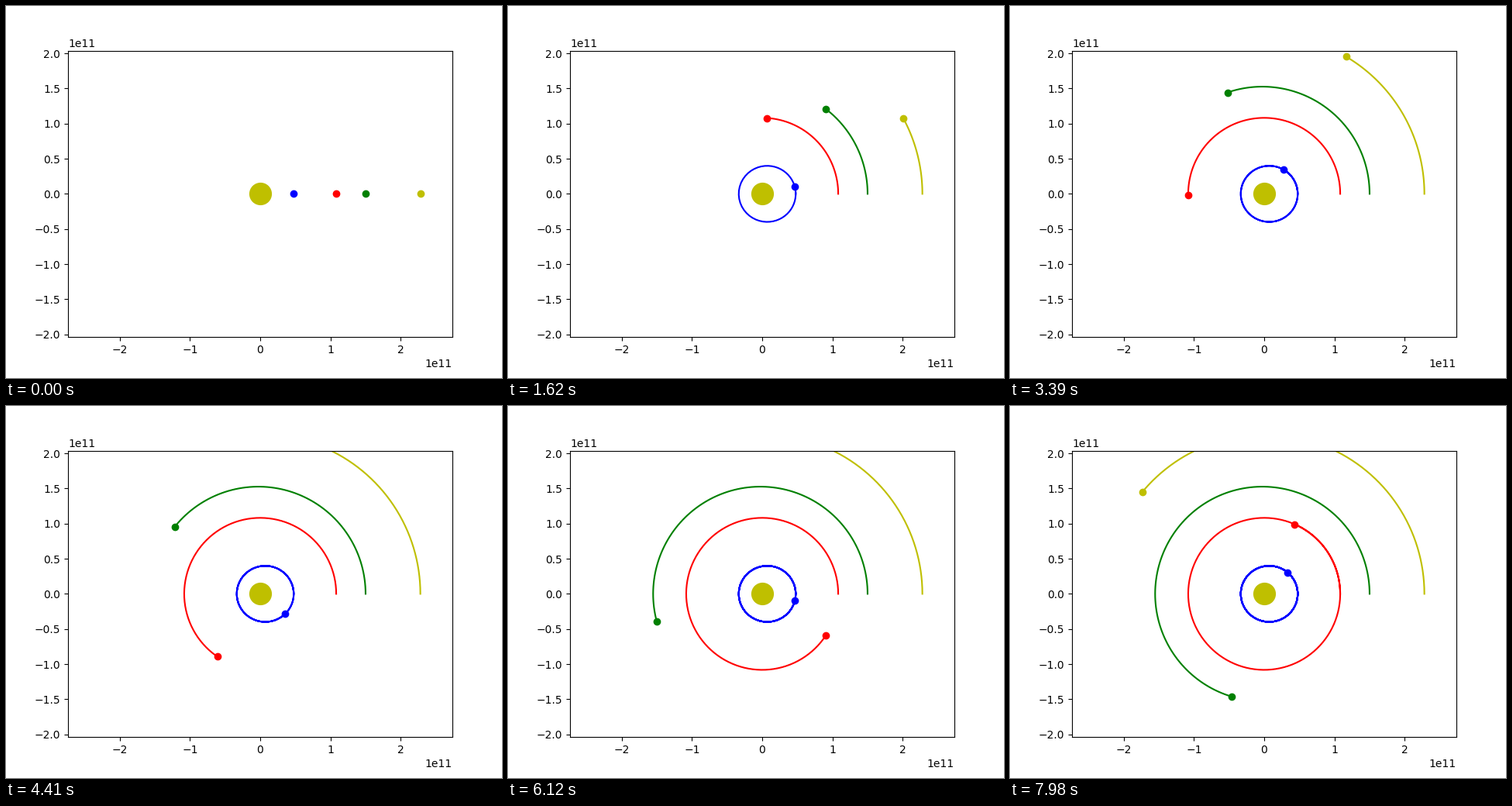
A matplotlib script that plays this animation: 640 px wide and 480 px high, repeating every 8000 ms.

```python
import numpy as np
import matplotlib.pyplot as plt
from matplotlib.animation import FuncAnimation

GM = 1.32712e20          # solar gravity, m^3/s^2
DAY = 86400.0
DAYS = 267
LOOP_MS = 8000
SUBSTEPS = 24

# start distance (m), start speed (m/s), colour
PLANETS = [
    (4.77e10, 47870, "b"),
    (1.082e11, 35020, "r"),
    (1.5e11, 30000, "g"),
    (2.28e11, 24070, "y"),
]


def gravity(pos):
    return -GM * pos / np.hypot(*pos) ** 3


def orbit(radius, speed):
    """Daily positions from leapfrog integration."""
    pos = np.array([radius, 0.0])
    vel = np.array([0.0, speed])
    dt = DAY / SUBSTEPS
    path = [pos.copy()]
    for _ in range(DAYS - 1):
        for _ in range(SUBSTEPS):
            vel = vel + gravity(pos) * dt / 2
            pos = pos + vel * dt
            vel = vel + gravity(pos) * dt / 2
        path.append(pos.copy())
    return np.array(path)


fig, ax = plt.subplots(figsize=(6.4, 4.8), dpi=100)
half_width = 1.2 * PLANETS[-1][0]
box = ax.get_position()
half_height = half_width * (box.height * 4.8) / (box.width * 6.4)
ax.set_xlim(-half_width, half_width)
ax.set_ylim(-half_height, half_height)

ax.plot([0], [0], "yo", markersize=20)

bodies = []
for radius, speed, color in PLANETS:
    trail, = ax.plot([], [], color=color)
    dot, = ax.plot([], [], "o", color=color)
    bodies.append((orbit(radius, speed), trail, dot))


def update(day):
    artists = []
    for path, trail, dot in bodies:
        trail.set_data(path[:day + 1, 0], path[:day + 1, 1])
        dot.set_data(path[day:day + 1, 0], path[day:day + 1, 1])
        artists += [trail, dot]
    return artists


anim = FuncAnimation(fig, update, frames=DAYS, interval=LOOP_MS / DAYS,
                     repeat=True, repeat_delay=0, blit=False)
plt.show()
```
